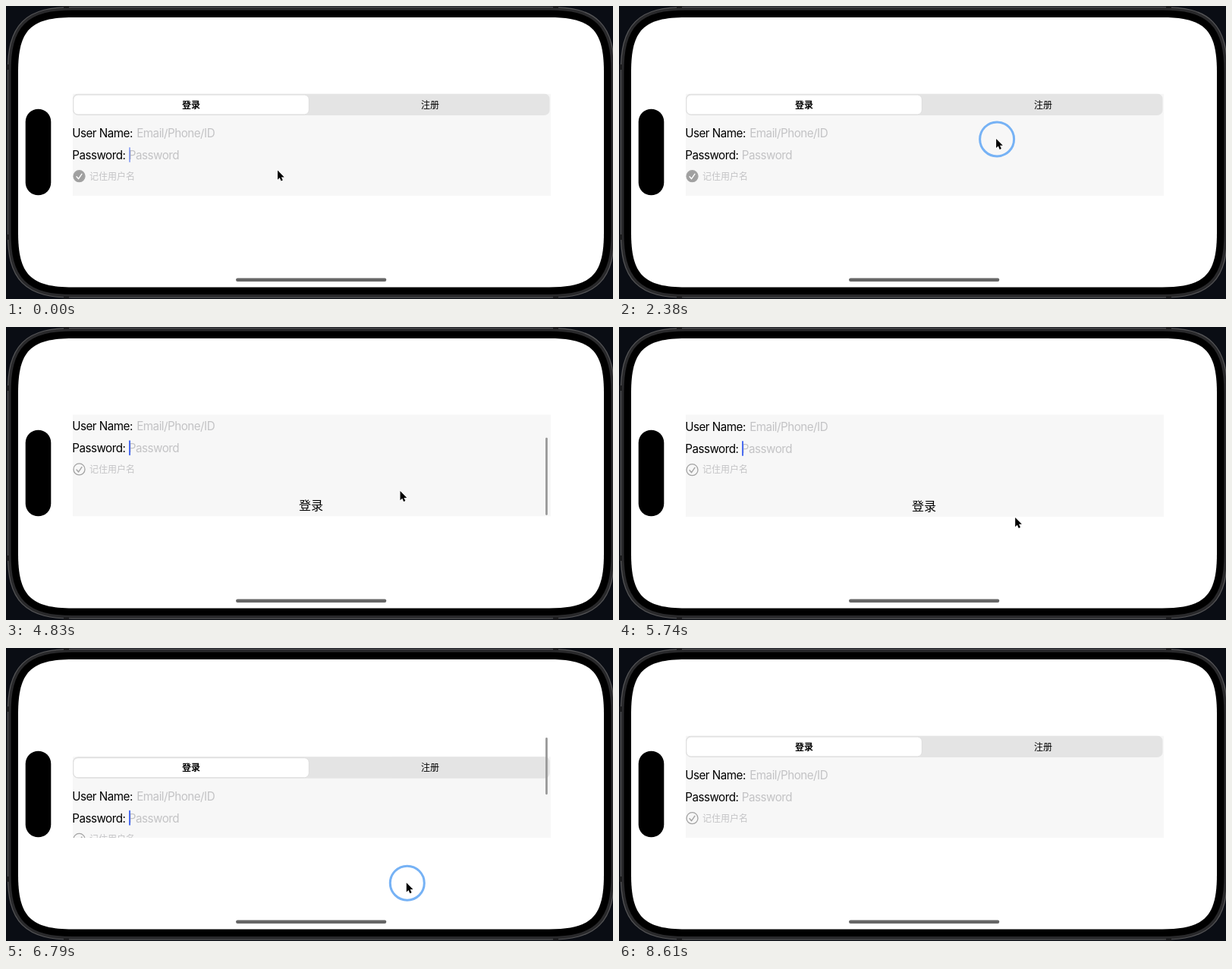
These frames come from a looping animation (800x386 px, 8680 ms). An HTML page:

```html
<!DOCTYPE html>
<html lang="zh-CN">
<head>
<meta charset="utf-8">
<title>Login form</title>
<style>
  html, body { margin: 0; width: 100%; height: 100%; overflow: hidden; background: #0a0d14; }
  svg { display: block; width: 800px; height: 386px; }
  text { font-family: Inter, "Noto Sans CJK SC", "Noto Sans CJK", sans-serif; font-size: 15.2px; letter-spacing: -.5px; }
  .hint { fill: #c3c3c5; }
  .zh { font-family: "Noto Sans CJK SC", "Noto Sans CJK", sans-serif; letter-spacing: 0; font-size: 12px; }
  .mid { text-anchor: middle; }
</style>
</head>
<body>
<svg viewBox="0 0 800 386">
  <defs>
    <clipPath id="view"><rect x="80" y="115.5" width="645" height="134.5"/></clipPath>
    <path id="screen"/>
  </defs>

  <!-- phone: rims are strokes around the screen shape -->
  <use href="#screen" stroke="#555557" stroke-width="28.500"/>
  <use href="#screen" stroke="#29292b" stroke-width="26"/>
  <use href="#screen" stroke="#000" stroke-width="19"/>
  <path d="M76 1.500h7M721 1.500h7M76 384h7M721 384h7M2.500 77v7M2.500 301v7" stroke="#1b1b1d" stroke-width="3"/>
  <use href="#screen" fill="#fff"/>
  <rect x="25.700" y="135.700" width="33.600" height="113.600" rx="16.800"/>
  <rect x="303" y="358.600" width="198.300" height="4.400" rx="2.200" fill="#666"/>

  <!-- form -->
  <g clip-path="url(#view)">
    <g id="form">
      <rect x="88" y="115.500" width="630" height="170.500" fill="#f7f7f7"/>
      <rect x="88" y="115.500" width="628.500" height="28.500" rx="7" fill="#e4e4e4"/>
      <rect x="88.800" y="117" width="310.500" height="26" rx="6" fill="#fff" stroke="#dcdcdc"/>
      <text class="zh mid" x="244" y="134.600" font-weight="600">登录</text>
      <text class="zh mid" x="559" y="134.600" font-weight="500">注册</text>
      <text x="87.200" y="173">User Name:</text>
      <text class="hint" x="172.200" y="173">Email/Phone/ID</text>
      <text x="87.200" y="202">Password:</text>
      <text class="hint" x="161.800" y="202">Password</text>
      <rect id="caret" x="162" y="186" width="2" height="20" rx="1" fill="#4b6cf0"/>
      <circle id="box" cx="96.500" cy="224.200" r="7.500" stroke="#a3a3a3" stroke-width="1.300"/>
      <path id="tick" d="M93 224.700l2.600 3 4.300-6.400" fill="none" stroke-width="1.400" stroke-linecap="round" stroke-linejoin="round"/>
      <text class="zh hint" x="110" y="228.500">记住用户名</text>
      <text class="zh mid" x="402" y="277.800" style="font-size:16px">登录</text>
    </g>
  </g>
  <rect id="bar" x="711" width="2.800" rx="1.400" fill="#999"/>

  <!-- pointer -->
  <circle id="ring" fill="none" stroke="#76b2f5" stroke-width="3"/>
  <path id="arrow" d="M0 0V12.200L2.700 9.700 4.600 14 6.800 13 4.900 8.900H8.700Z" stroke="#fff" stroke-width="1.200" paint-order="stroke"/>
</svg>
<script>
const LOOP = 8680, STEP = 70;
const TOP = 116, VIEW = 134, TRAVEL = 36;   // scroll view
const GLIDE = 650, SLOP = 8, SPRING = 95;   // pointer and touch feel
const BLINK = 516;

const $ = id => document.getElementById(id);
const clamp = (v, lo = 0, hi = 1) => Math.max(lo, Math.min(hi, v));
const ramp = (t, from, to) => clamp((t - from) / (to - from));
const smooth = u => u * u * (3 - 2 * u);
const mix = (a, b, u) => a.map((v, i) => v + (b[i] - v) * u);
const set = (id, attrs) => { for (const k in attrs) $(id).setAttribute(k, attrs[k]); };

// the pointer rests or drags from down to up, then glides to the next stop
const stop = (down, up, from, to = from, touch = true) => ({ down, up, from, to, touch });
const hover = (down, up, at) => stop(down, up, at, at, false);
const stops = [
  hover(0, 0, [359, 217]),
  hover(700, 1890, [488, 228]),
  stop(2340, 2730, [498, 174], [502, 222]),
  stop(3150, 3570, [508, 226], [510, 164]),
  stop(4200, 4610, [518, 215], [520, 192]),
  stop(5260, 5460, [522, 284]),
  stop(6370, 6860, [525, 202], [529, 316])
];
const touches = stops.filter(s => s.touch);
const drags = touches.filter(s => s.from[1] < TOP + VIEW && s.to !== s.from);

const dragAt = (s, t) => mix(s.from, s.to, smooth(ramp(t, s.down, s.up)));

function pointerAt(t) {
  const i = stops.findLastIndex(s => t >= s.down);
  const s = stops[i], next = stops[i + 1];
  if (t < s.up || !next) return dragAt(s, t);
  const end = Math.min(next.down, s.up + GLIDE);
  return mix(s.to, next.from, smooth(ramp(t, s.up, end)));
}

// past an edge the content follows the finger with growing resistance
function rubber(y) {
  const edge = clamp(y, -TRAVEL, 0), over = Math.abs(y - edge);
  return edge + Math.sign(y - edge) * VIEW * (1 - 1 / (over * .55 / VIEW + 1));
}

function scrollAt(t) {
  let rest = 0, y = 0;
  for (const s of drags) {
    if (t < s.down) break;
    const pull = dragAt(s, t)[1] - s.from[1];
    const held = rubber(rest + Math.sign(pull) * Math.max(0, Math.abs(pull) - SLOP));
    rest = clamp(held, -TRAVEL, 0);
    y = rest + (held - rest) * Math.exp(-Math.max(0, t - s.up) / SPRING);
  }
  return y;
}

// strongest of all fade-in, fade-out envelopes
const envelope = (list, t, lead, rise, hold, fall) => Math.max(...list.map(s =>
  Math.min(ramp(t, s.down + lead, s.down + lead + rise), 1 - ramp(t, s.up + hold, s.up + hold + fall))));

function caretAlpha(t) {
  const k = Math.floor((t + 50) / BLINK);
  const u = ramp(t + 50 - k * BLINK, 0, 110);
  return k % 2 ? u : 1 - u;
}

// rounded rectangle whose corners ease into the straight sides
function squircle(x, y, w, h, e, c) {
  const k = e * c, d = e - k;
  return `M${x + e} ${y}h${w - 2 * e}c${d} 0 ${e} ${k} ${e} ${e}v${h - 2 * e}` +
    `c0 ${d} ${-k} ${e} ${-e} ${e}h${2 * e - w}c${-d} 0 ${-e} ${-k} ${-e} ${-e}` +
    `v${2 * e - h}c0 ${-d} ${k} ${-e} ${e} ${-e}z`;
}

function draw(t) {
  const [x, y] = pointerAt(t);
  const dy = scrollAt(t);

  set("form", { transform: `translate(0 ${dy})` });
  set("caret", { opacity: caretAlpha(t) });
  const checked = t < drags[0].up;
  set("box", { fill: checked ? "#a0a0a0" : "none" });
  set("tick", { stroke: checked ? "#fff" : "#a3a3a3" });

  // the scroll bar shrinks while the content is pulled past an edge
  const over = Math.max(0, dy, -TRAVEL - dy);
  const part = clamp(-dy / TRAVEL);
  set("bar", { y: 118 + part * (27 + over), height: 103 - over, opacity: envelope(drags, t, 60, 100, 420, 200) });

  const shown = envelope(touches, t, -70, 100, 0, 140);
  set("ring", { cx: x, cy: y, r: 30 - 7.500 * shown, opacity: shown });
  set("arrow", { transform: `translate(${x - 1} ${y - .5})`, opacity: t < 8400 ? 1 : 0 });
}

set("screen", { d: squircle(16, 15, 772, 355.5, 72, .23), fill: "none" });
$("screen").removeAttribute("fill");

const start = performance.now();
function tick() {
  const t = (performance.now() - start) % LOOP;
  draw(Math.floor(t / STEP) * STEP);
  requestAnimationFrame(tick);
}
tick();
</script>
</body>
</html>
```
